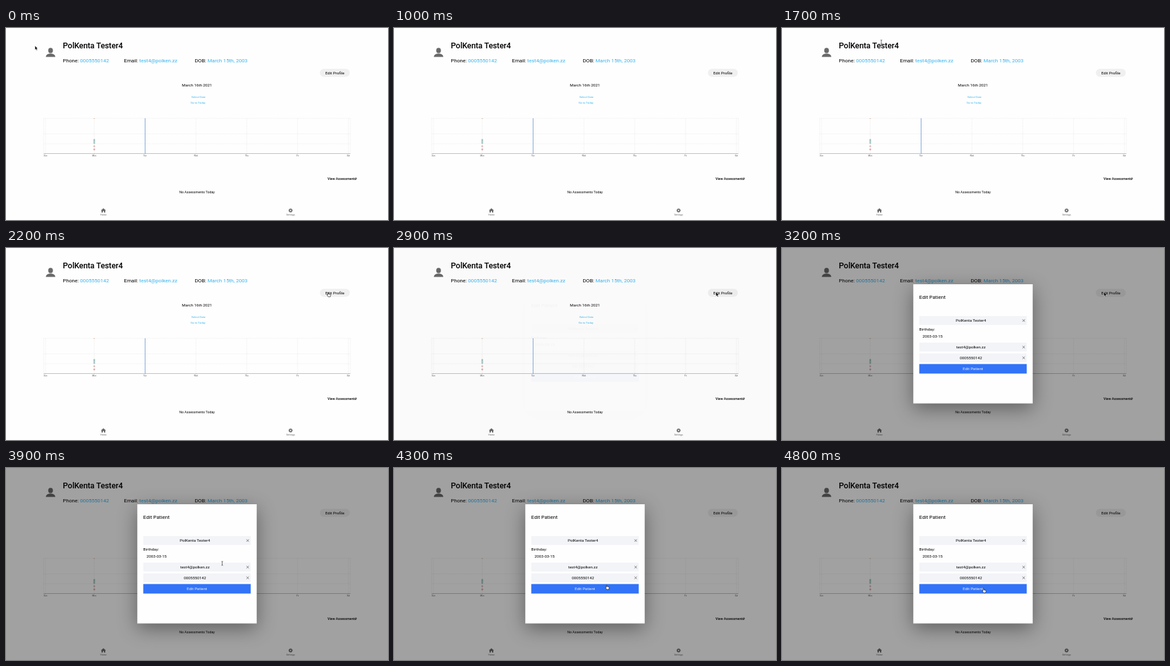
Animation, 600 px wide and 302 px high, one loop 5000 ms. Source, as an HTML page:

```html
<!DOCTYPE html>
<html lang="en">
<head>
<meta charset="utf-8">
<title>Patient profile</title>
<style>
  html, body { margin: 0; width: 100%; height: 100%; overflow: hidden; background: #fefefe; }
  svg { display: block; width: 100%; height: 100%; }
  text { font: 6.25px Roboto, Arial, sans-serif; fill: #000; white-space: pre; }
  .name { font-size: 12.5px; font-weight: 500; letter-spacing: -.1px; }
  .info { font-size: 8.125px; }
  .mid { text-anchor: middle; }
  .link { fill: #35b2ee; }
  .tiny { font-size: 4.375px; }
  .note { font-size: 5.3px; }
  .bold { font-weight: 500; }
  .day { font-size: 3.1px; fill: #555; }
  .tab { font-size: 3.75px; fill: #666; }
  .icon { fill: #6a6a6a; }
  .field { fill: #f3f4f7; }
  .grid { stroke: #e3e3e3; stroke-width: .5; stroke-dasharray: 1.5 1; }
  #sheet { fill: #fefefe; filter: drop-shadow(0 8.75px 15px rgba(0, 0, 0, .4)); }
</style>
</head>
<body>
<svg viewBox="0 0 600 302" preserveAspectRatio="none">
  <g class="icon">
    <ellipse cx="70" cy="35.4" rx="3.7" ry="4.1"/>
    <path d="M62.6 45.6c0-3.800 3.700-5.400 7.400-5.400s7.400 1.600 7.400 5.400z"/>
  </g>
  <text class="name" x="89.300" y="32.200">PolKenta Tester4</text>
  <text class="info" x="89.300" y="54">Phone: <tspan class="link">0005550142</tspan></text>
  <text class="info" x="185.300" y="54">Email: <tspan class="link">test4@polken.zz</tspan></text>
  <text class="info" x="296.500" y="54">DOB: <tspan class="link">March 15th, 2003</tspan></text>

  <rect x="493" y="64.300" width="47" height="12.400" rx="6.200" fill="#f0f0f1"/>
  <text class="mid" x="516.500" y="72.600">Edit Profile</text>
  <text class="mid" x="300" y="91.800">March 16th 2021</text>
  <text class="mid tiny link" x="302.300" y="110.400">Select Date</text>
  <text class="mid tiny link" x="301.600" y="119.200">Go to Today</text>

  <g id="chart"></g>

  <text class="note bold" x="505" y="238.600">View Assessments</text>
  <path d="M549.2 235l1.500 1.800-1.500 1.800" fill="none" stroke="#000" stroke-width=".7"/>
  <text class="note mid" x="300" y="259.700">No Assessments Today</text>

  <path class="icon" d="M153 283.500l4 3.500h-1v3.300h-2.100v-2.300h-1.800v2.300H150V287h-1z"/>
  <text class="tab mid" x="153" y="295.200">Home</text>
  <g fill="none" stroke="#6a6a6a">
    <circle cx="447" cy="287" r="1.800" stroke-width="1.500"/>
    <circle cx="447" cy="287" r="2.800" stroke-width="1" stroke-dasharray="1.300 .9"/>
  </g>
  <text class="tab mid" x="447" y="295.200">Settings</text>

  <rect id="dim" width="600" height="302"/>

  <g id="modal">
    <rect id="sheet" x="206.250" y="57" width="187.500" height="187.500"/>
    <text class="info" x="215.600" y="80">Edit Patient</text>
    <g id="fields"></g>
    <text x="215.600" y="130">Birthday:</text>
    <text x="220.700" y="140.800">2003-03-15</text>
    <rect x="215.600" y="182.500" width="168.800" height="15" fill="#3273f8"/>
    <text class="mid" x="300" y="192.200" style="fill:#eaf0ff">Edit Patient</text>
  </g>

  <g id="cursor">
    <path id="arrow" d="M0 0V6.200L1.400 5 2.400 7.200 3.500 6.700 2.500 4.600H4.300z" fill="#000" stroke="#fff" stroke-width=".4"/>
    <path id="beam" d="M-1.300-3.200Q0-3.200 0-2.400V2.400Q0 3.200-1.300 3.200M1.300-3.200Q0-3.200 0-2.400M0 2.400Q0 3.200 1.300 3.200" fill="none" stroke="#222" stroke-width=".65"/>
    <path id="hand" d="M-.6 .2Q0-.5 .6 .2V2.500L3.600 3.200Q4.200 3.500 4 4.500L3.300 7H.2L-1.900 4.300Q-1.900 3.400-.6 4.100z" fill="#fff" stroke="#111" stroke-width=".65"/>
  </g>
</svg>
<script>
const $ = id => document.getElementById(id);

function add(parent, tag, attrs, text) {
  const el = document.createElementNS("http://www.w3.org/2000/svg", tag);
  for (const key in attrs) el.setAttribute(key, attrs[key]);
  if (text) el.textContent = text;
  return parent.appendChild(el);
}

const line = (x1, y1, x2, y2, extra) => add($("chart"), "line", { x1, y1, x2, y2, ...extra });

function drawChart() {
  const days = ["Sun", "Mon", "Tue", "Wed", "Thu", "Fri", "Sat"];
  const grid = { class: "grid" };
  for (const y of [142, 166.5, 182]) line(59, y, 541, y, grid);
  for (const x of [59, 541]) line(x, 142, x, 197.5, grid);
  days.forEach((day, i) => {
    const x = i ? 58.7 + i * 79.85 : 62;
    line(x, 142, x, 197.5, grid);
    line(x, 197.5, x, 199, { stroke: "#999", "stroke-width": .4 });
    add($("chart"), "text", { class: "day mid", x, y: 202.2 }, day);
  });
  line(59, 197.5, 541, 197.5, { stroke: "#a3a5ab", "stroke-width": .7 });
  line(218.5, 142, 218.5, 197.5, { stroke: "#6f9fdc", "stroke-width": .9 });
  line(137.3, 142.4, 139.8, 142.4, { stroke: "#e0b090", "stroke-width": .7 });
  const dots = [[176, "#4d8f7c"], [178.4, "#4d8f7c"], [180.8, "#508fa0"], [186, "#bd8078"], [191, "#d04f55"]];
  for (const [cy, stroke] of dots)
    add($("chart"), "circle", { cx: 138.6, cy, r: 1, fill: "none", stroke, "stroke-width": .6 });
}

function drawFields() {
  const rows = [["PolKenta Tester4", 107], ["test4@polken.zz", 148.8], ["0005550142", 165.6]];
  for (const [value, y] of rows) {
    add($("fields"), "rect", { class: "field", x: 215.6, y, width: 168.8, height: 14 });
    add($("fields"), "text", { class: "mid", x: 296.8, y: y + 9.2 }, value);
    const cross = `M377.700 ${y + 5.2}l3.800 3.800m0-3.800l-3.800 3.800`;
    add($("fields"), "path", { d: cross, stroke: "#555", "stroke-width": .75 });
  }
}

// start ms, pointer shape, x, y
const track = [
  [0, "arrow", 45.6, 28],
  [100, "arrow", 33, 15],
  [200, "arrow", 14, 1],
  [300, ""],
  [1700, "beam", 156, 22],
  [1800, "arrow", 285, 34],
  [1900, "arrow", 390, 49],
  [2000, "arrow", 458, 61],
  [2100, "hand", 494, 68],
  [2200, "hand", 506, 69.8],
  [2900, "arrow", 505.8, 69.5],
  [3500, "arrow", 490, 76],
  [3600, "arrow", 450, 94],
  [3700, "arrow", 400, 118],
  [3800, "arrow", 358, 140],
  [3900, "beam", 339.6, 150],
  [4000, "beam", 346, 156],
  [4100, "beam", 348, 166],
  [4200, "beam", 343, 176],
  [4300, "hand", 334, 184],
  [4400, "hand", 326, 188],
  [4500, "hand", 319, 189.5],
  [4600, "hand", 316.4, 189.2]
];

// start ms, backdrop opacity, modal opacity, modal drop
const fade = [
  [0, 0, 0, 40],
  [2900, .015, .025, 13],
  [3000, .335, .93, 1.9],
  [3100, .365, .99, .3],
  [3200, .37, 1, 0]
];

const at = (steps, t) => steps.filter(step => step[0] <= t).pop();

function render(t) {
  const [, shape, x = 0, y = 0] = at(track, t);
  for (const id of ["arrow", "beam", "hand"])
    $(id).style.display = id === shape ? "" : "none";
  $("cursor").setAttribute("transform", `translate(${x} ${y})`);

  const [, dim, opacity, drop] = at(fade, t);
  $("dim").style.opacity = dim;
  $("modal").style.opacity = opacity;
  $("modal").setAttribute("transform", `translate(0 ${drop})`);
}

drawChart();
drawFields();
const start = performance.now();
function tick() {
  render((performance.now() - start) % 5000);
  requestAnimationFrame(tick);
}
tick();
</script>
</body>
</html>
```
